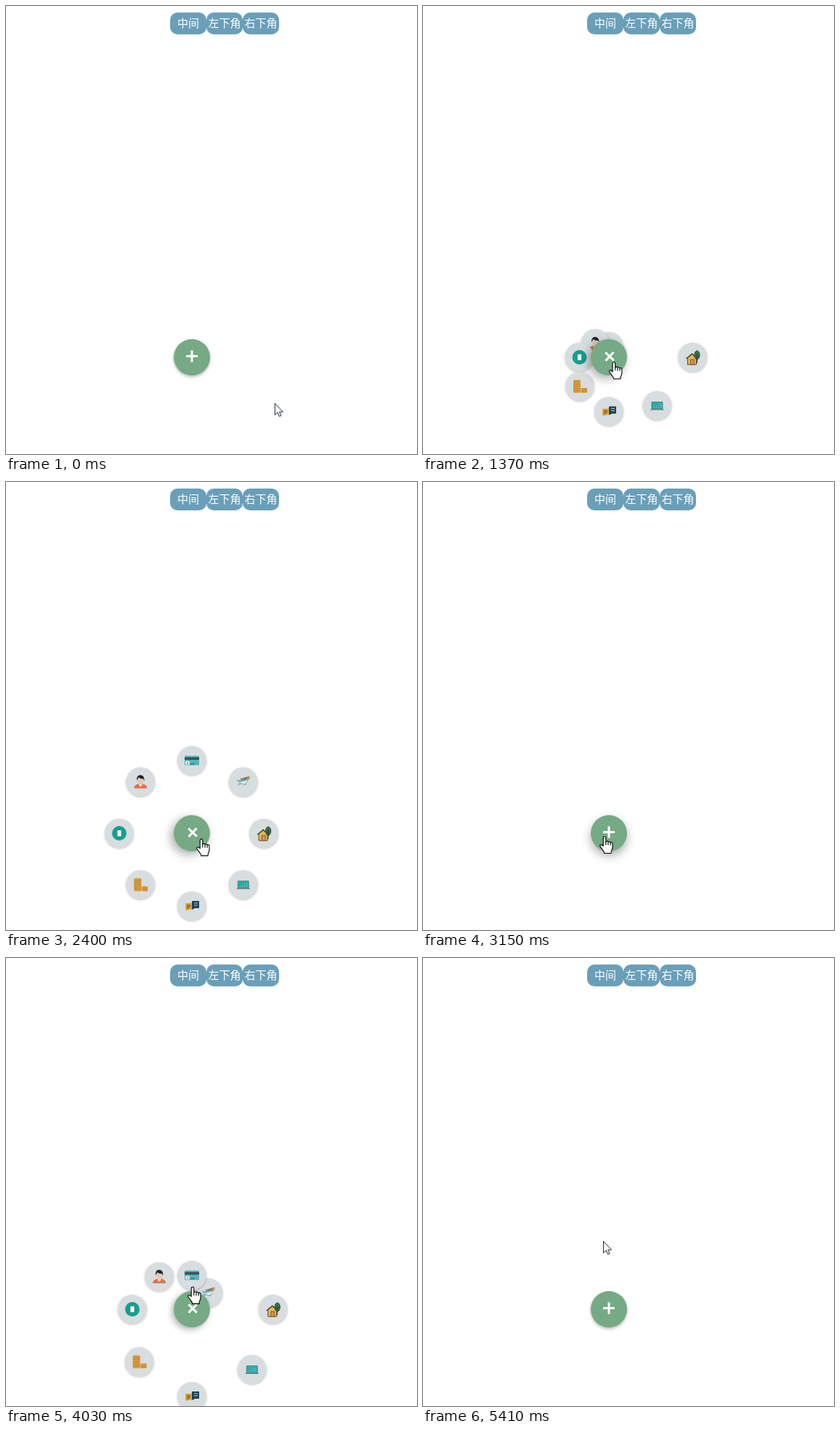
An HTML page that plays this animation: 566 by 616 pixels, repeating every 5740 ms.

```html
<!DOCTYPE html>
<html lang="zh">
<head>
<meta charset="utf-8">
<title>Radial menu</title>
<style>
  html, body { margin: 0; width: 100%; height: 100%; overflow: hidden; background: #fff; }
  svg { display: block; width: 566px; height: 616px; }
  .tab rect { fill: #6a9fb9; }
  .tab text { fill: #fff; font: 15px "Noto Sans CJK SC", "Noto Sans CJK", sans-serif; text-anchor: middle; }
  .disc { fill: #d8dde0; filter: drop-shadow(0 1.5px 1.6px rgba(0, 0, 0, .24)); }
  #main circle { fill: #75aa84; }
  .cursor { fill: #fff; stroke-linejoin: round; }
</style>
</head>
<body>
<svg viewBox="0 0 566 616">
  <g id="tabs"></g>
  <g id="items"></g>
  <g id="main">
    <circle r="25"/>
    <path d="M-8 -1.5H8M0 -9.5V6.5" stroke="#fff" stroke-width="3"/>
  </g>
  <path id="arrow" class="cursor" stroke="#1c2b33" d="M.5 .5V16.5L4.2 13L6.6 18.4L9 17.4L6.7 12.2H11.6Z"/>
  <g id="hand" class="cursor" stroke="#000" stroke-width="1.1">
    <path d="M-1.8 2C-1.8 0 1.8 0 1.8 2V8C1.8 6.4 5 6.5 5 8.3C5.2 7 8 7.2 8.1 9C8.4 8 11 8.2 11 10.3V15C11 18 9 19.5 9 23.5H-.2C-.4 20.5 -3.2 18.6 -5.8 14.4C-7.6 11.4 -4.6 10.4 -1.8 13.6Z"/>
    <path fill="none" d="M1.8 7.5V12M5 8.5V12.3M8.1 9.2V12.6"/>
  </g>
</svg>
<script>
const LOOP = 5740, CX = 256, CY = 483;
const OPEN = 500, CLOSE = 300, STAGGER = 40, TURN = 450;
const SESSIONS = [[1029, 2380], [3593, 4780]];
const HOVER = [640, 3950], HAND = [645, 5375];
const CURSOR = [
  [0, 370, 546], [610, 262, 503], [890, 255, 487], [1100, 255, 487],
  [1580, 269, 491], [2940, 269, 490], [3150, 250, 487], [3370, 250, 487],
  [3600, 252, 482], [3890, 257, 453], [4030, 257, 452], [4450, 248, 400],
  [4520, 248, 393], [4590, 248, 389], [LOOP, 248, 389]
];

// Clockwise from the right; each icon is drawn around its disc centre.
const ICONS = [
  `<path fill="#e6b850" stroke="#5b4a35" d="M-7 10V1L-1 -4L5 1V10Z"/>
   <path fill="none" stroke="#4a4436" stroke-width="1.3" d="M-9 2L-1 -5L7 2"/>
   <path fill="#d98f45" stroke="#5b4a35" stroke-width=".7" d="M-3 10V3H2V10Z"/>
   <ellipse cx="6" cy="-3" rx="3.6" ry="6" fill="#3f7448" stroke="#24442f"/>
   <path stroke="#24442f" d="M6 -6V8M6 0L8 -3M6 1L4 -2"/>`,
  `<path fill="#2ba9a8" stroke="#4b8b86" d="M-7.5 -5H7.5V4.5H-7.5Z"/>
   <path fill="none" stroke="#79c9c4" stroke-width=".8" d="M-4 3V1M-1 3V0M2 3V-2M5 3V-3"/>
   <path stroke="#647a7b" stroke-width="1.4" d="M-9 5.4H9"/>`,
  `<path fill="#e2a63d" d="M-9 -4H0V5H-5L-8 7V5H-9Z"/>
   <path stroke="#594632" d="M-7 -1H-2M-7 1H-2M-7 3H-4"/>
   <path fill="#1d4356" d="M1 -7H9Q10 -7 10 -6V2Q10 3 9 3H4L1 5Q0 4 0 3V-6Q0 -7 1 -7Z"/>
   <path stroke="#b9d0d5" d="M3 -4H8M3 -1H8"/>`,
  `<rect x="-9" y="-9" width="10" height="18" rx="1.5" fill="#dda03f"/>
   <rect x="1.5" y="2" width="8.5" height="7" rx="1.5" fill="#dda03f"/>
   <path stroke="#b47a31" stroke-width=".9" d="M-9 -6H1M-9 -3H1M-9 0H1M-9 3H1M-9 6H1M2 4.5H10M2 7H10"/>`,
  `<circle r="10" fill="#12a18f"/>
   <rect x="-3" y="-4.5" width="6" height="9" rx=".8" fill="#fff" stroke="#3a6963" stroke-width=".7"/>`,
  `<path fill="#e0704a" d="M-9 9Q-9 4 -3 3H3Q9 4 9 9Z"/>
   <path fill="#f3ddd3" d="M-2 2H2V5L0 7L-2 5Z"/>
   <ellipse cy="-2" rx="4.5" ry="5.6" fill="#e2c8bb"/>
   <path fill="#202426" d="M-5 -2C-7 -12 7 -12 5 -1L4 -4Q0 -4 -3 -6Z"/>`,
  `<rect x="-10" y="-6.5" width="20" height="13" rx="1" fill="#54b5b8"/>
   <path fill="#34535f" d="M-10 -4.5H10V-1H-10Z"/>
   <rect x="-8.5" y="1" width="5" height="4.5" fill="#fff"/>
   <path stroke="#34535f" d="M-6 2V5M-2 4.5H4"/>`,
  `<path fill="#79b5b8" d="M-10 -2L7 -4L3 5L-2 3L-8 5L-5 1Z"/>
   <path fill="#63757b" d="M-4 -4L9 -8L6 -4L-2 -2Z"/>
   <path fill="#e6edee" d="M-6 1L6 -2L2 3L-2 2Z"/>
   <path fill="#dc8b4d" d="M5 -6L10 -6L6 -1ZM-5 -5L1 -5L-1 -3Z"/>`
];

const $ = id => document.getElementById(id);
const clamp = v => Math.min(1, Math.max(0, v));
const mix = (a, b, p) => a + (b - a) * p;
const place = (el, x, y, turn = 0) =>
  el.setAttribute("transform", `translate(${x.toFixed(2)} ${y.toFixed(2)}) rotate(${turn.toFixed(2)})`);

function bezier(x1, y1, x2, y2) {
  const at = (a, b, s) => 3 * a * s * (1 - s) ** 2 + 3 * b * s * s * (1 - s) + s ** 3;
  return x => {
    if (x <= 0 || x >= 1) return clamp(x);
    let lo = 0, hi = 1;
    for (let i = 0; i < 24; i++) {
      const mid = (lo + hi) / 2;
      if (at(x1, x2, mid) < x) lo = mid; else hi = mid;
    }
    return at(y1, y2, lo);
  };
}
const easeIn = bezier(.42, 0, 1, 1);
const ease = bezier(.25, .1, .25, 1);

$("tabs").innerHTML = ["中间", "左下角", "右下角"].map((label, i) =>
  `<g class="tab" transform="translate(${226 + 50 * i} 9)">
     <rect width="50" height="30" rx="10"/><text x="25" y="20.3">${label}</text></g>`).join("");

const items = ICONS.map(icon => {
  const g = document.createElementNS("http://www.w3.org/2000/svg", "g");
  g.innerHTML = `<circle class="disc" r="20"/>${icon}`;
  $("items").prepend(g);
  return g;
});

// Flies out past its place, then settles back.
function openDistance(p) {
  return p < .7 ? 120 * easeIn(p / .7) : mix(120, 100, easeIn(clamp((p - .7) / .3)));
}

function distance(t, i) {
  const session = SESSIONS.find(([a, b]) => t >= a && t < b + 700);
  if (!session) return 0;
  const delay = i * STAGGER, [a, b] = session;
  return t < b
    ? openDistance(clamp((t - a - delay) / OPEN))
    : 100 * (1 - easeIn(clamp((t - b - delay) / CLOSE)));
}

const between = (t, [a, b], d) => ease(clamp((t - a) / d)) - ease(clamp((t - b) / d));

function cursorAt(t) {
  const n = CURSOR.findIndex(k => k[0] > t);
  const [t0, x0, y0] = CURSOR[n - 1], [t1, x1, y1] = CURSOR[n];
  const p = (t - t0) / (t1 - t0);
  return [mix(x0, x1, p), mix(y0, y1, p)];
}

function draw(t) {
  items.forEach((g, i) => {
    const d = distance(t, i), angle = i * Math.PI / 4;
    g.style.display = d > .5 ? "" : "none";
    place(g, CX + d * Math.cos(angle), CY + d * Math.sin(angle));
  });

  const turn = SESSIONS.reduce((sum, s) => sum + between(t, s, TURN), 0);
  place($("main"), CX, CY, 45 * turn);
  const h = between(t, HOVER, 300);
  $("main").firstElementChild.style.filter =
    `drop-shadow(0 ${mix(2, 6, h)}px ${mix(2, 6.5, h)}px rgba(0,0,0,${mix(.28, .32, h)}))`;

  const [x, y] = cursorAt(t);
  const isHand = t >= HAND[0] && t < HAND[1];
  $("hand").style.display = isHand ? "" : "none";
  $("arrow").style.display = isHand ? "none" : "";
  place(isHand ? $("hand") : $("arrow"), x, y);
}

const start = performance.now();
function tick() {
  draw((performance.now() - start) % LOOP);
  requestAnimationFrame(tick);
}
tick();
</script>
</body>
</html>
```
